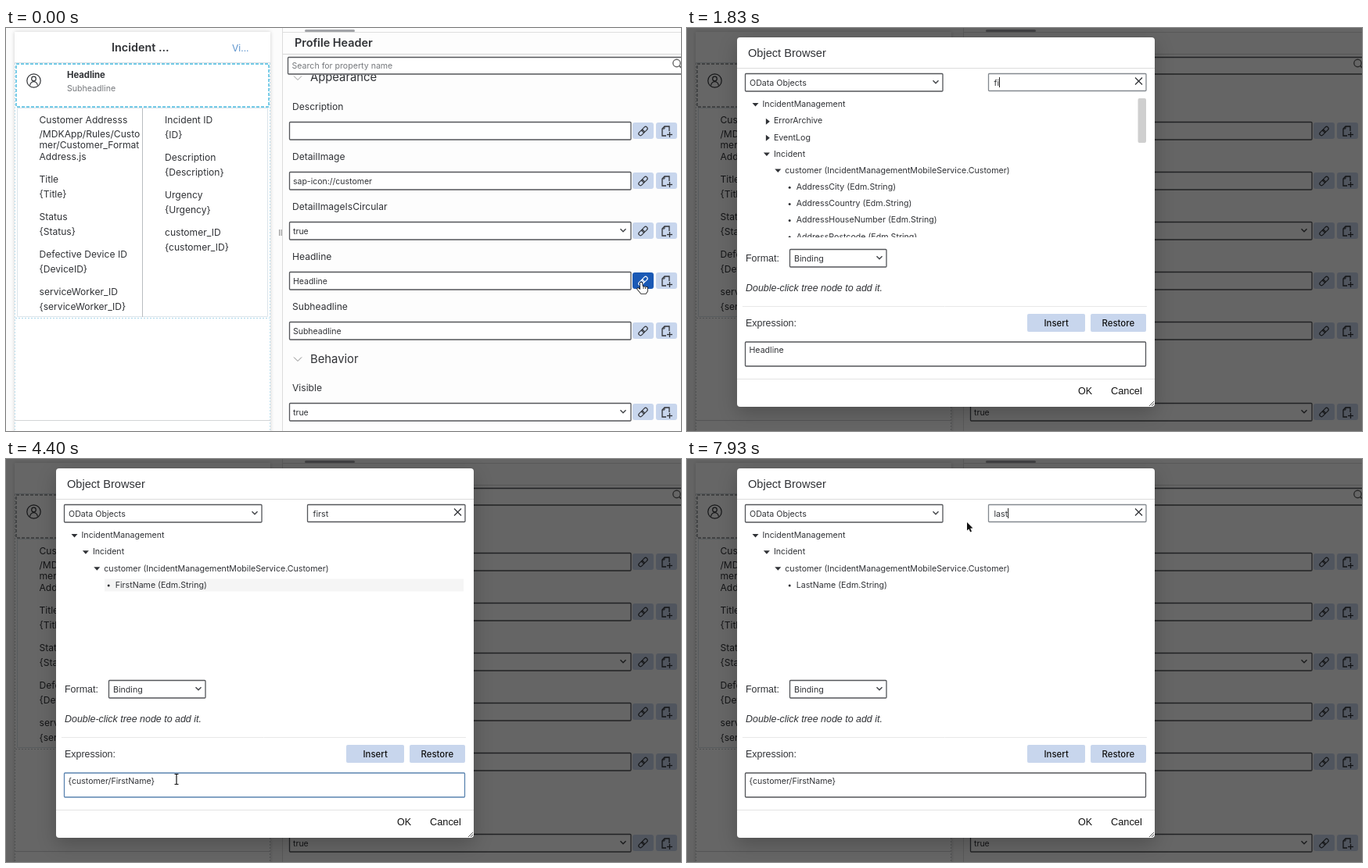
These frames come from a looping animation (863 by 516 pixels, 8000 ms). An HTML page with a canvas:

```html
<!DOCTYPE html>
<html lang="en">
<head>
<meta charset="utf-8">
<title>Object Browser</title>
<style>
  html, body { margin: 0; width: 100%; height: 100%; overflow: hidden; background: #fff; }
  canvas { display: block; }
</style>
</head>
<body>
<canvas id="stage" width="863" height="516"></canvas>
<script>
const W = 863, H = 516, LOOP = 8000;
const ctx = document.getElementById('stage').getContext('2d');
const UI = 'Inter, "Liberation Sans", sans-serif';
const SANS = '"Liberation Sans", Arial, sans-serif';
const INK = '#303236', BORDER = '#54565a', BLUE = '#c8d6ed';

// ---- helpers ----
function text(str, x, y, size = 12, color = INK, style = '', family = UI) {
  ctx.font = `${style} ${size}px ${family}`;
  ctx.fillStyle = color;
  ctx.fillText(str, x, y);
}
function fill(x, y, w, h, color, r = 0) {
  ctx.fillStyle = color;
  ctx.beginPath();
  ctx.roundRect(x, y, w, h, r);
  ctx.fill();
}
function box(x, y, w, h, color = BORDER, r = 1, width = 1.3) {
  ctx.strokeStyle = color;
  ctx.lineWidth = width;
  ctx.beginPath();
  ctx.roundRect(x + .5, y + .5, w, h, r);
  ctx.stroke();
}
function line(points, color = INK, width = 1) {
  ctx.strokeStyle = color;
  ctx.lineWidth = width;
  ctx.beginPath();
  points.forEach(([x, y]) => ctx.lineTo(x, y));
  ctx.stroke();
}
function circle(x, y, r, color = INK, width = 1.2) {
  ctx.strokeStyle = color;
  ctx.lineWidth = width;
  ctx.beginPath();
  ctx.arc(x, y, r, 0, 7);
  ctx.stroke();
}
function shape(points, color, outline) {
  ctx.beginPath();
  points.forEach(([x, y]) => ctx.lineTo(x, y));
  ctx.closePath();
  if (outline) {
    ctx.strokeStyle = outline;
    ctx.lineWidth = 1.6;
    ctx.lineJoin = 'round';
    ctx.stroke();
  }
  ctx.fillStyle = color;
  ctx.fill();
}
function at(x, y, draw, angle = 0) {
  ctx.save();
  ctx.translate(x, y);
  ctx.rotate(angle);
  draw();
  ctx.restore();
}
function dashed(pattern, draw) {
  ctx.setLineDash(pattern);
  draw();
  ctx.setLineDash([]);
}
const chevron = (x, y, s = 3.5, color = '#45474b', width = 1.5) =>
  line([[x - s, y - s / 2], [x, y + s / 2], [x + s, y - s / 2]], color, width);
const magnifier = (x, y, color) => {
  circle(x, y, 4.7, color, 1.4);
  line([[x + 3.5, y + 3.5], [x + 8, y + 8]], color, 1.8);
};

// ---- page behind the dialog ----
function linkIcon(x, y, color) {
  at(x, y, () => {
    ctx.strokeStyle = color;
    ctx.lineWidth = 1.1;
    for (const dx of [-7, -1]) {
      ctx.beginPath();
      ctx.roundRect(dx, -2.4, 8, 4.8, 2.4);
      ctx.stroke();
    }
  }, -Math.PI / 4);
}
function pageIcon(x, y) {
  line([[x + 4, y], [x + 4, y - 6], [x - 2, y - 6], [x - 5, y - 3], [x - 5, y + 6], [x, y + 6]], INK, 1.3);
  line([[x - 2, y - 6], [x - 2, y - 3], [x - 5, y - 3]], INK, 1);
  line([[x + 1, y + 4.5], [x + 8, y + 4.5]], INK, 1.3);
  line([[x + 4.5, y + 1], [x + 4.5, y + 8]], INK, 1.3);
}
function property(label, y, value, isSelect, active) {
  text(label, 366, y - 27.5, 12.1);
  fill(362, y - 12, 437, 23, '#fff');
  box(362, y - 12, 436.5, 22.5);
  text(value, 367, y + 4, 10.5);
  if (isSelect) chevron(789, y - 1);
  fill(801, y - 11, 27, 21, active ? '#1a59b5' : BLUE, 3);
  fill(831, y - 11, 27, 21, BLUE, 3);
  linkIcon(814.5, y, active ? '#fff' : INK);
  pageIcon(844, y);
}
function preview(active) {
  ctx.save();
  ctx.shadowColor = 'rgba(0,0,0,.18)';
  ctx.shadowBlur = 5;
  fill(11, 5, 327, 530, '#fff');
  ctx.restore();
  text('Incident ...', 135, 30, 14.4, INK, '600');
  text('Vi...', 289, 30, 12, '#5b93cd');
  line([[11, 44.5], [338, 44.5]], '#d5dde3');
  dashed([2, 2], () => {
    const dots = active ? '#bfe0ef' : '#c4c8cc';
    line([[11.5, 45], [11.5, 516]], dots);
    line([[337.5, 45], [337.5, 516]], dots);
    line([[12, 371.5], [337, 371.5]], active ? '#a9d6ea' : '#c4c8cc');
  });
  dashed([4, 2], () => box(12.5, 45.5, 323, 55, active ? '#45b9de' : '#85898d', 0, 1.4));
  box(14, 102, 320, 267, '#dbe4ea', 0, 1);
  line([[174.5, 103], [174.5, 370]], '#b9bcc0');
  line([[11, 502.5], [338, 502.5]], '#d2d4d6');

  circle(35.5, 67.5, 8.7);
  circle(35.5, 65, 2.8);
  ctx.beginPath();
  ctx.arc(35.5, 73.5, 4.8, Math.PI, 0);
  ctx.stroke();
  text('Headline', 78, 64, 11.3, INK, '700');
  text('Subheadline', 78, 80.5, 10.6, '#76797d');

  ['Customer Addresss', '/MDKApp/Rules/Custo', 'mer/Customer_Format', 'Address.js']
    .forEach((row, i) => text(row, 42.5, [122, 140, 154, 169][i], 12.1));
  ['Title', 'Status', 'Defective Device ID', 'serviceWorker_ID'].forEach((label, i) => {
    text(label, 42.5, 197.5 + 48 * i, 12.1);
    text(`{${['Title', 'Status', 'DeviceID', 'serviceWorker_ID'][i]}}`, 42.5, 216.5 + 48 * i, 12.1);
  });
  ['Incident ID', 'Description', 'Urgency', 'customer_ID'].forEach((label, i) => {
    text(label, 203, 122 + 48 * i, 12.1);
    text(`{${i ? label : 'ID'}}`, 203, 141 + 48 * i, 12.1);
  });
}
function page(active) {
  fill(0, 0, W, H, '#fcfcfc');
  preview(active);
  fill(353, 0, 510, H, '#fdfdfd');
  line([[353.5, 0], [353.5, H]], '#dcdcdc');
  fill(349, 258, 1.2, 8, '#999');
  fill(351.5, 258, 1.2, 8, '#999');
  fill(382, 2, 64, 3, '#a2a4a8', 1.5);
  line([[354, 5.5], [W, 5.5]], '#dedede');
  text('Profile Header', 369, 24, 14.4, INK, '600');
  line([[354, 33.5], [W, 33.5]], '#d5d5d5');

  ctx.save();
  ctx.beginPath();
  ctx.rect(354, 60, 509, 60);
  ctx.clip();
  text('Appearance', 389, 68, 14.8);
  chevron(373, 64, 5, '#999', 1);
  ctx.restore();
  fill(361, 37, 510, 22, '#fff');
  box(360, 37, 510, 21.5);
  text('Search for property name', 365.5, 51.5, 10.6, '#76797d');
  magnifier(857.5, 45, '#666');

  property('Description', 132, '');
  property('DetailImage', 196, 'sap-icon://customer');
  property('DetailImageIsCircular', 260, 'true', true);
  property('Headline', 324, 'Headline', false, active);
  property('Subheadline', 388, 'Subheadline');
  chevron(373, 424, 5, '#888', 1);
  text('Behavior', 389, 429, 14.8);
  property('Visible', 492, 'true', true);
}

// ---- dialog ----
// Tree rows: [depth, label, marker]; markers: v open, > closed, . leaf
const ROOT = [0, 'IncidentManagement', 'v'], INCIDENT = [1, 'Incident', 'v'];
const CUSTOMER = [2, 'customer (IncidentManagementMobileService.Customer)', 'v'];
const leaf = name => [3, `${name} (Edm.String)`, '.'];
const FULL_TREE = [ROOT, [1, 'ErrorArchive', '>'], [1, 'EventLog', '>'], INCIDENT, CUSTOMER,
  ...['AddressCity', 'AddressCountry', 'AddressHouseNumber', 'AddressPostcode'].map(leaf)];
const filtered = name => [ROOT, INCIDENT, CUSTOMER, leaf(name)];

function tree(rows, hover, full) {
  ctx.save();
  ctx.beginPath();
  ctx.rect(70, 86, 520, 182);
  ctx.clip();
  rows.forEach(([depth, label, marker], i) => {
    const x = 96.5 + 14.4 * depth, y = 97.5 + 21.15 * i;
    if (i === hover) {
      full ? fill(112, y - 7.5, 463, 17.5, '#ebebeb') : fill(126, y - 7.5, 459, 16, '#f5f5f5');
    }
    if (marker === 'v') shape([[x - 13, y - 1.5], [x - 5, y - 1.5], [x - 9, y + 3]], INK);
    if (marker === '>') shape([[x - 10, y - 3], [x - 5, y + 1], [x - 10, y + 5]], INK);
    if (marker === '.') fill(x - 10, y - .5, 3, 3, INK, 1.5);
    text(label, x, y + 3.8, 10.63);
  });
  ctx.restore();
  if (full) fill(576.5, 90, 10.5, 57, '#cfcfcf', 2);
}
function button(label, x, w, textX) {
  fill(x, 366, w, 23, BLUE, 2);
  text(label, textX, 381.5, 11.4, '#111', '500');
}
function dialog(s) {
  ctx.save();
  ctx.shadowColor = 'rgba(0,0,0,.22)';
  ctx.shadowBlur = 24;
  ctx.shadowOffsetY = 8;
  fill(64, 12, 534, 473, '#fff', 4);
  ctx.restore();
  text('Object Browser', 78, 36.5, 14.6, INK, '', SANS);
  line([[64, 51.5], [598, 51.5]], '#dcdcdc');
  box(74, 58, 252.5, 22.5);
  text('OData Objects', 80, 74, 10.65);
  chevron(318, 69);

  box(385, 58, 201.5, 22, s.focus === 'search' ? '#83898f' : BORDER);
  ctx.font = `10.65px ${UI}`;
  const end = 392.5 + ctx.measureText(s.query).width;
  if (s.selected) fill(392, 62, end - 392, 15, '#b3d4fb');
  if (s.query) {
    text(s.query, 392.5, 73.5, 10.65);
    line([[573, 63.5], [582, 72.5]], INK, 1.3);
    line([[582, 63.5], [573, 72.5]], INK, 1.3);
  } else {
    text('Search for data field', 392, 73.5, 10.65, '#76797d');
    magnifier(575.5, 66.5, '#666');
  }
  if (s.focus === 'search' && !s.selected) fill(s.query ? end : 391, 63, 1, 13, '#222');

  tree(s.rows, s.hover, s.rows === FULL_TREE);

  text('Format:', 75, 299, 12.45, INK, '', SANS);
  box(131, 283, 123.5, 22.5);
  text('Binding', 137, 299, 10.65);
  chevron(246, 294);
  text('Double-click tree node to add it.', 75, 337, 12.45, INK, 'italic', SANS);
  line([[71, 356.5], [588, 356.5]], '#e8e8e8');
  text('Expression:', 75, 382, 12.45, INK, '', SANS);
  button('Insert', 435, 74, 456.5);
  button('Restore', 516, 71, 530.5);
  box(74, 401.5, 512, 31, s.focus === 'expression' ? '#5b84b0' : BORDER);
  text(s.expression, 79.5, 415.5, 10.6);
  if (s.caret) fill(189.5, 405, 1, 13, '#222');
  line([[64, 449.5], [598, 449.5]], '#e4e4e4');
  text('OK', 500, 469, 12.5, '#111', '', SANS);
  text('Cancel', 542, 469, 12.8, '#111', '', SANS);
  line([[591, 484], [597, 478]], '#555');
  line([[594, 484], [597, 481]], '#555');
}

// ---- pointer ----
// [time, x, y]; linear in between
const PATH = [[0, 811, 326], [260, 811, 326], [460, 690, 265], [630, 512, 184], [660, 500, 178],
  [900, 470, 120], [1430, 430, 70], [2430, 400, 90], [2600, 174, 199], [2800, 182, 168],
  [3200, 196, 160], [3760, 196, 160], [4050, 207, 260], [4400, 218, 410], [4530, 218, 410],
  [4660, 219, 406], [4830, 218, 405], [5230, 218, 405], [5500, 330, 230], [5830, 442, 82],
  [5930, 442, 82], [6130, 446, 74], [6330, 446, 74], [6530, 394, 76], [7060, 380, 71],
  [7260, 380, 71], [7930, 358, 81], [LOOP, 358, 81]];

function pointerAt(t) {
  const i = PATH.findIndex(p => p[0] > t);
  const [t0, x0, y0] = PATH[i - 1], [t1, x1, y1] = PATH[i];
  const k = (t - t0) / (t1 - t0);
  return [x0 + (x1 - x0) * k, y0 + (y1 - y0) * k];
}
function hand() {
  shape([[0, 0], [2, 0], [3, 5], [9, 6], [9, 11], [7, 14], [1, 14], [-4, 8], [-3, 7], [0, 9]], '#fff', '#111');
  line([[4, 5], [4, 8]], '#111', .8);
  line([[6.5, 6], [6.5, 8]], '#111', .8);
}
function beam() {
  line([[0, -6], [0, 6]], '#111', 1.2);
  line([[-2.5, -6.5], [2.5, -6.5]], '#111');
  line([[-2.5, 6.5], [2.5, 6.5]], '#111');
}
const arrow = () =>
  shape([[0, 0], [0, 10.5], [2.4, 8.4], [4.2, 12.5], [6, 11.7], [4.2, 7.8], [7.5, 7.5]], '#111', '#fff');

function pointer(t, x, y) {
  if ((t >= 1530 && t < 2430) || (t >= 7260 && t < 7930)) return;
  const overField = (x > 386 && x < 587 && y > 58 && y < 81) || (x > 75 && x < 587 && y > 402 && y < 433);
  at(x, y, t < 30 ? hand : overField ? beam : arrow);
}

// ---- timeline ----
const latest = (t, steps) => steps.filter(([start]) => start <= t).pop()[1];

function render(t) {
  const [x, y] = pointerAt(t);
  const rows = latest(t, [[0, FULL_TREE], [2130, filtered('FirstName')], [7630, filtered('LastName')]]);
  const row = Math.floor((y - 90) / 21.15);
  const overTree = x > 110 && x < 575 && y > 88 && y < 268;
  let hover = -1;
  if (t < 1530 && overTree) hover = row;
  if (t >= 2600 && t < 3760 && overTree && row === 3) hover = 3;
  if (t >= 3760 && t < 7630) hover = 3;

  page(t < 30);
  if (t >= 30) {
    const shown = Math.min(1, .25 + .25 * Math.floor((t - 30) / 76));
    fill(0, 0, W, H, `rgba(0,0,0,${.6 * shown})`);
    ctx.globalAlpha = shown;
    dialog({
      rows, hover,
      query: latest(t, [[0, ''], [1530, 'f'], [1830, 'fi'], [1930, 'fir'], [2130, 'first'],
        [7260, 'l'], [7630, 'la'], [7730, 'last']]),
      selected: t >= 6800 && t < 7260,
      focus: latest(t, [[0, 'search'], [3260, 'expression'], [6330, 'search']]),
      expression: t < 3330 ? 'Headline' : '{customer/FirstName}',
      caret: t >= 4660 && t < 5230
    });
    ctx.globalAlpha = 1;
  }
  pointer(t, x, y);
}
function frame() {
  render(performance.now() % LOOP);
  requestAnimationFrame(frame);
}
frame();
</script>
</body>
</html>
```
